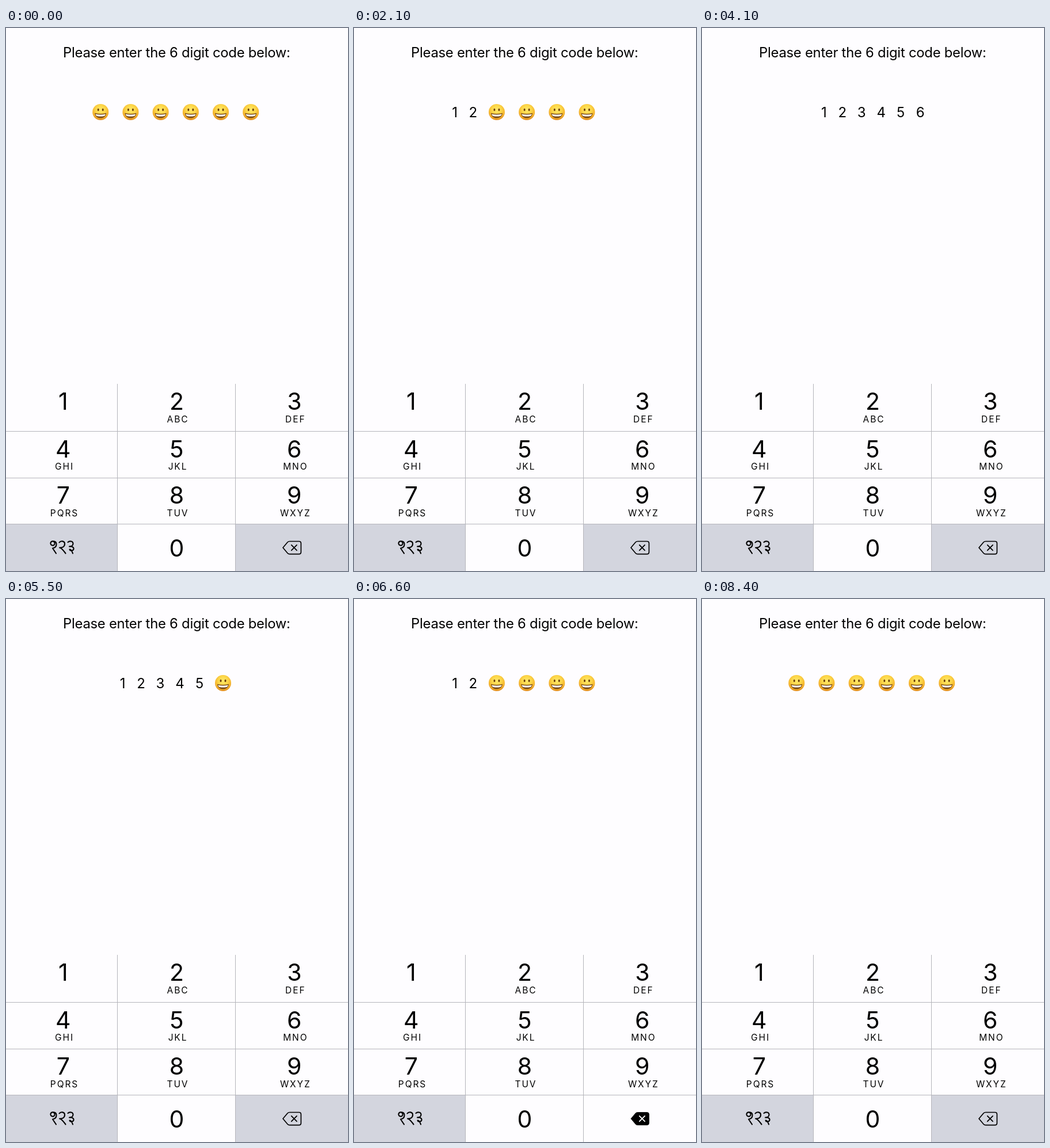
These frames come from a looping animation (594 by 943 pixels, 8.5 s). An HTML page:

```html
<!DOCTYPE html>
<html lang="en">
<head>
<meta charset="utf-8">
<title>Code entry</title>
<style>
  html, body { margin: 0; width: 100%; height: 100%; overflow: hidden; background: #fefdff; }
  svg { display: block; width: 594px; height: 943px; }
  text { font-family: Inter, Roboto, sans-serif; font-optical-sizing: none; fill: #000; text-anchor: middle; }
  .title { font-size: 23.8px; letter-spacing: -0.23px; }
  .code { font-size: 24px; }
  .num { font-size: 41px; }
  .sub { font-size: 15.5px; letter-spacing: 1.9px; }
</style>
</head>
<body>
<svg id="stage" viewBox="0 0 594 943" xmlns="http://www.w3.org/2000/svg">
  <defs>
    <radialGradient id="skin" cx="0.5" cy="0.36" r="0.66">
      <stop offset="0" stop-color="#ffe96a"/>
      <stop offset="0.45" stop-color="#fcd648"/>
      <stop offset="0.75" stop-color="#f5b52e"/>
      <stop offset="1" stop-color="#dd821a"/>
    </radialGradient>
    <g id="face">
      <circle r="14" fill="url(#skin)"/>
      <ellipse cx="-4" cy="-4" rx="1.5" ry="2.2" fill="#6b3d0c"/>
      <ellipse cx="4" cy="-4" rx="1.5" ry="2.2" fill="#6b3d0c"/>
      <path d="M-10 1.8Q0 4.2 10 1.8C9.7 7.4 5.4 10.6 0 10.6S-9.7 7.4-10 1.8Z" fill="#7a4a14"/>
      <path d="M-8.7 3.4Q0 5.4 8.7 3.4C8.2 5.8 7 6.6 5.8 6.9Q0 8.2-5.8 6.9C-7 6.6-8.2 5.8-8.7 3.4Z" fill="#fff"/>
    </g>
  </defs>
  <rect width="594" height="943" fill="#fefdff"/>
  <text class="title" x="296.4" y="50.5">Please enter the 6 digit code below:</text>
  <g id="code"></g>
  <g id="keys"></g>
  <path d="M193.5 618V943M398.5 618V943M0 700.5H594M0 781.5H594M0 861.5H594" stroke="#b5b5bb" fill="none"/>
  <g id="labels"></g>
  <g fill="none" stroke="#000" stroke-width="2.1" stroke-linecap="round" stroke-linejoin="round">
    <path d="M81 898.5A3.6 3.6 0 1 1 84.6 895C84.6 898 82 899 81 898.5M78 893C81 890 87.5 891 87.5 896.5C87.5 901 84 903 81 903.5L87 912.5"/>
    <path d="M92.5 893.5C95 890 102 890.5 102 896C102 901 97 903 93 902.5C97 903 100 908 103.5 912.5"/>
    <path d="M107.5 893C110 890.5 116.5 890.5 116.5 895.5C116.5 899 113 900.5 110 900.5C114 899.5 118 901.5 117.5 905C116.5 908.5 111 908 110.5 905.5C112.5 905 115 909 116 912.5"/>
  </g>
  <path id="del" d="M481 902.5L489 893Q490.4 891.5 492.6 891.5H509Q512.4 891.5 512.4 895V910Q512.4 913.6 509 913.6H492.6Q490.4 913.6 489 912Z"
        stroke="#000" stroke-linejoin="round"/>
  <path id="cross" d="M495.8 897.8L505 907.2M505 897.8L495.8 907.2" fill="none" stroke-width="1.8" stroke-linecap="round"/>
</svg>
<script>
const LOOP = 8500, HOLD = 100;
const GREY = '#d3d5de', WHITE = '#fefdff';
const colX = [0, 194, 399, 594], rowY = [618, 701, 782, 862, 943];
const numX = [99.3, 296.5, 500.8], base = [662.6, 745.5, 826.2, 918];
const subX = [101.5, 298.5, 502.8], subY = [685.3, 767.2, 848];
const subs = ['', 'ABC', 'DEF', 'GHI', 'JKL', 'MNO', 'PQRS', 'TUV', 'WXYZ'];
const typed = [1000, 1600, 2200, 2800, 3400, 4000];
const erased = [5200, 5700, 6100, 6600, 7100, 7500];

const $ = id => document.getElementById(id);
function add(parent, tag, attrs, text) {
  const el = document.createElementNS('http://www.w3.org/2000/svg', tag);
  for (const k in attrs) el.setAttribute(k, attrs[k]);
  if (text) el.textContent = text;
  parent.appendChild(el);
  return el;
}

const keys = [];
for (let i = 0; i < 12; i++) {
  const c = i % 3, r = Math.floor(i / 3);
  keys.push(add($('keys'), 'rect', {
    x: colX[c], y: rowY[r], width: colX[c + 1] - colX[c], height: rowY[r + 1] - rowY[r]
  }));
  if (i < 9 || i === 10) add($('labels'), 'text', { class: 'num', x: numX[c], y: base[r] }, i < 9 ? i + 1 : '0');
  if (subs[i]) add($('labels'), 'text', { class: 'sub', x: subX[c], y: subY[r] }, subs[i]);
}

const slots = [1, 2, 3, 4, 5, 6].map(n => ({
  digit: add($('code'), 'text', { class: 'code', y: 154.7 }, n),
  face: add($('code'), 'use', { href: '#face' })
}));

// distance from slot i to the next one when the first n hold digits
function gap(i, n) {
  if (i >= n) return 52.2;
  if (i === n - 1) return i ? 41 : 39.6;
  return [31.8, 33.5][i] || 34;
}

function draw(ms) {
  const t = ms % LOOP;
  const isDown = s => t >= s && t < s + HOLD;
  const n = typed.filter(s => t >= s + HOLD).length - erased.filter(s => t >= s).length;

  let x = n ? 156.7 + 9.2 * n : 164.2;
  slots.forEach((s, i) => {
    const on = i < n;
    s.digit.setAttribute('x', x);
    s.face.setAttribute('transform', `translate(${x} 146)`);
    s.digit.setAttribute('display', on ? 'inline' : 'none');
    s.face.setAttribute('display', on ? 'none' : 'inline');
    x += gap(i, n);
  });

  const pressed = typed.findIndex(isDown), del = erased.some(isDown);
  keys.forEach((k, i) => {
    const grey = i === 9 || i === pressed || (i === 11 && !del);
    k.setAttribute('fill', grey ? GREY : WHITE);
  });
  $('del').setAttribute('fill', del ? '#000' : 'none');
  $('del').setAttribute('stroke-width', del ? 0.8 : 1.7);
  $('cross').setAttribute('stroke', del ? '#fff' : '#000');
}

const start = performance.now();
function tick() {
  draw(performance.now() - start);
  requestAnimationFrame(tick);
}
draw(0);
requestAnimationFrame(tick);
</script>
</body>
</html>
```
